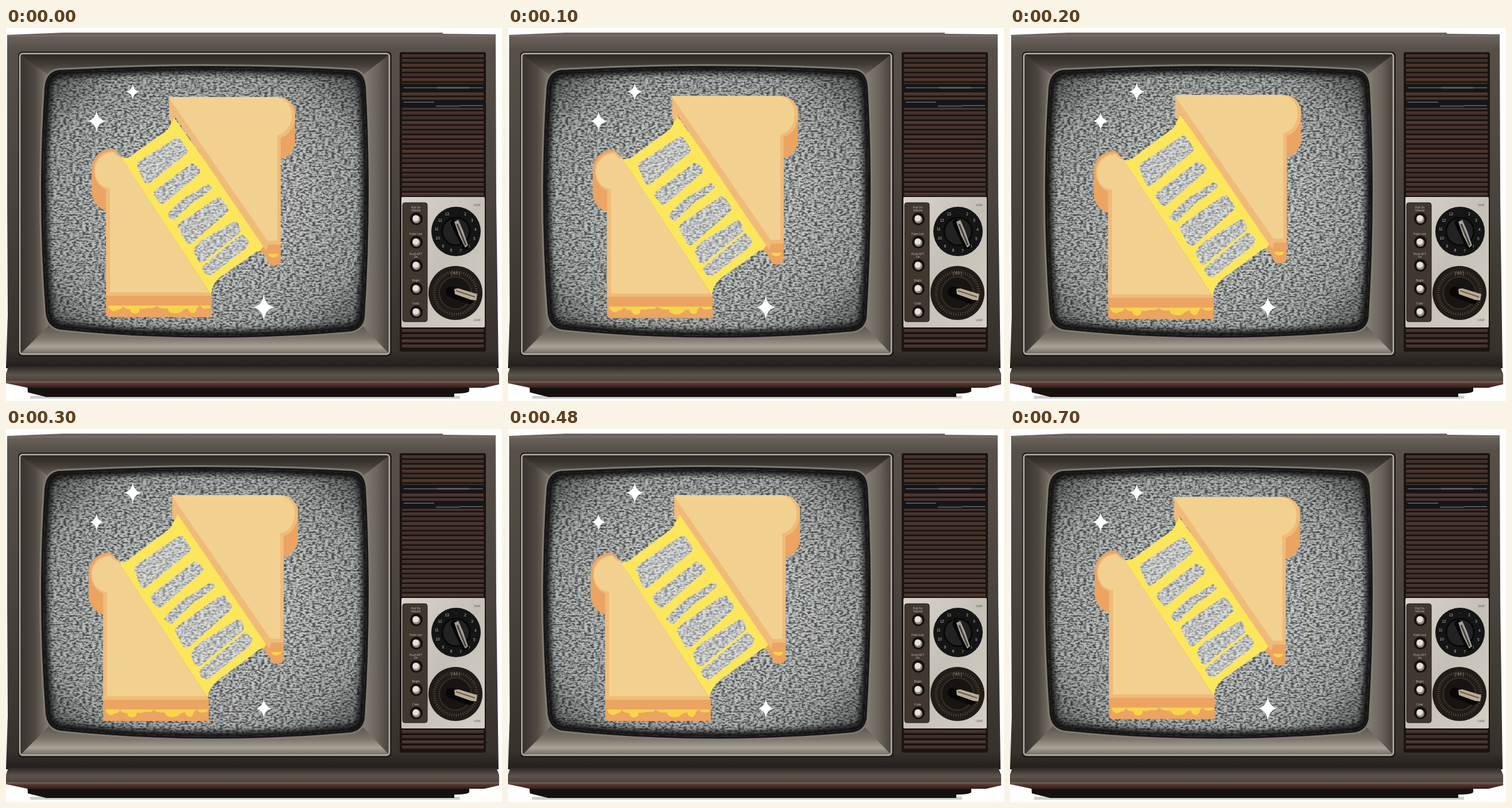
Recreate the animation shown at these times as an HTML page. Size 863 px wide and 649 px high, loop 0.8 s.

```html
<!DOCTYPE html>
<html lang="en">
<head>
<meta charset="utf-8">
<title>Toastie on TV</title>
<style>
html, body { margin: 0; width: 100%; height: 100%; overflow: hidden; background: #fff; }
svg { display: block; width: 100vw; height: 100vh; }
text { font-family: "Liberation Sans", Arial, sans-serif; text-anchor: middle; }
.face { fill: #f2d190; }
.crust { fill: #f0bb79; }
.side { fill: #eba461; }
.drip { fill: #f8d44c; }
</style>
</head>
<body>
<svg viewBox="0 0 863 649" preserveAspectRatio="none">
<defs>
  <linearGradient id="body" x2="0" y2="1">
    <stop stop-color="#6f675f"/><stop offset=".05" stop-color="#575049"/>
    <stop offset=".5" stop-color="#49433d"/><stop offset=".95" stop-color="#37312c"/><stop offset="1" stop-color="#211d1a"/>
  </linearGradient>
  <linearGradient id="top" x2="0" y2="1">
    <stop stop-color="#2b2724"/><stop offset=".5" stop-color="#443e38"/><stop offset="1" stop-color="#6b645b"/>
  </linearGradient>
  <linearGradient id="bottom" x2="0" y2="1">
    <stop stop-color="#5c564e"/><stop offset=".45" stop-color="#7c766b"/><stop offset=".75" stop-color="#a8a297"/><stop offset="1" stop-color="#716a61"/>
  </linearGradient>
  <linearGradient id="left">
    <stop stop-color="#383330"/><stop offset=".5" stop-color="#4e4841"/><stop offset="1" stop-color="#827b70"/>
  </linearGradient>
  <linearGradient id="right">
    <stop stop-color="#857f75"/><stop offset=".55" stop-color="#6a645b"/><stop offset="1" stop-color="#47413b"/>
  </linearGradient>
  <linearGradient id="ledge" x2="0" y2="1">
    <stop stop-color="#2b2724"/><stop offset=".4" stop-color="#5d554d"/><stop offset=".66" stop-color="#4b433d"/>
    <stop offset=".72" stop-color="#7b6155"/><stop offset=".8" stop-color="#56372f"/><stop offset="1" stop-color="#2f1e1a"/>
  </linearGradient>
  <linearGradient id="plate" x2="1" y2="1">
    <stop stop-color="#d8d4cb"/><stop offset=".5" stop-color="#c5c0b6"/><stop offset="1" stop-color="#d3cfc5"/>
  </linearGradient>
  <radialGradient id="shade" r=".7">
    <stop offset=".4" stop-opacity="0"/><stop offset=".72" stop-opacity=".14"/><stop offset="1" stop-opacity=".65"/>
  </radialGradient>
  <filter id="snow" x="0" y="0" width="1" height="1" color-interpolation-filters="sRGB">
    <feTurbulence type="fractalNoise" baseFrequency=".18 .33" numOctaves="2" seed="4"/>
    <feColorMatrix values="0 0 0 1 0  0 0 0 1 0  0 0 0 1 0  0 0 0 0 1"/>
    <feComponentTransfer>
      <feFuncR type="table" tableValues=".28 .28 .3 .39 .62 .76 .78 .79 .8"/>
      <feFuncG type="table" tableValues=".29 .29 .31 .4 .64 .78 .8 .81 .82"/>
      <feFuncB type="table" tableValues=".29 .29 .31 .4 .63 .77 .79 .8 .81"/>
    </feComponentTransfer>
  </filter>
  <filter id="soft"><feGaussianBlur stdDeviation="5"/></filter>
  <path id="glass" d="M92 77Q346 63 602 77 620 79 622 103 633 300 620 503 617 521 599 524 346 547 96 521 76 518 73 496 58 300 71 105 73 80 92 77Z"/>
  <clipPath id="screen"><use href="#glass"/></clipPath>
  <path id="pull" d="M194 223Q212 231 224 218L276 181Q290 172 288 150L458 386Q438 386 430 393L372 434Q358 445 357 463L350 460Z"/>
  <mask id="gaps" maskUnits="userSpaceOnUse" x="0" y="0" width="863" height="649">
    <path fill="#fff" d="M0 0H863V649H0Z"/>
    <g stroke="#000" stroke-width="14" stroke-linejoin="round">
      <path d="M235 238 298 198 309 214 246 264Z"/>
      <path d="M264 288 324 243 331 249 272 299Z"/>
      <path stroke-width="6" d="M284 325Q307 298 325 291L351 275 355 278Q340 292 324 300L292 331Z"/>
      <path d="M306 345 370 302 380 316 319 369Z"/>
      <path d="M334 388Q338 377 354 370L398 344 401 352 340 401Z"/>
      <path stroke-width="9" d="M346 417 410 364 418 372 416 379 355 426 349 423Z"/>
    </g>
  </mask>
  <path id="star" fill="#fff" d="M0-1Q.13-.16 1 0 .13.16 0 1-.13.16-1 0-.13-.16 0-1Z"/>
</defs>

<!-- cabinet -->
<path fill="#bbb" d="M42 640H790V645H42Z" opacity=".7"/>
<path fill="#16110f" d="M37 618H806V632Q803 636 780 636V642H70L38 634Z"/>
<path fill="url(#body)" d="M2 12 100 8H760V10L852 11 853 300 857 592H0L3 500 2 300Z"/>
<path fill="url(#ledge)" d="M4 589H853L858 602V620L832 626H38L0 618V602Z"/>
<path fill="none" stroke="#8a837a" stroke-width="1.5" d="M4 14H850" opacity=".5"/>

<!-- bezel -->
<rect x="21" y="41" width="650" height="531" rx="7" fill="#211e1b"/>
<path fill="url(#top)" d="M25 46H667L620 82H74Z"/>
<path fill="url(#left)" d="M25 46 74 82 62 300 74 520 25 567Z"/>
<path fill="url(#right)" d="M667 46 620 82 632 300 620 520 667 567Z"/>
<path fill="url(#bottom)" d="M25 567 74 518 346 535 620 518 667 567Z"/>
<rect x="24" y="44.500" width="643" height="523" rx="5" fill="none" stroke="#b8b3aa" stroke-width="2.500"/>
<use href="#glass" fill="none" stroke="#817a70" stroke-width="14"/>
<use href="#glass" fill="#151413" stroke="#191716" stroke-width="8"/>

<!-- screen -->
<g clip-path="url(#screen)">
  <rect x="60" y="64" width="572" height="480" filter="url(#snow)"/>
  <rect x="60" y="64" width="572" height="480" fill="url(#shade)"/>
  <use href="#glass" fill="none" stroke="#111" stroke-width="16" filter="url(#soft)"/>
</g>

<!-- speaker and controls -->
<rect x="685" y="42" width="150" height="521" rx="3" fill="#1b1411"/>
<g id="slats"></g>
<path fill="#15161a" d="M688 97H833V109H688ZM688 125H833V139H688Z"/>
<path stroke="#55565a" stroke-width="2" d="M692 104H830M692 129H745M790 135H830"/>
<path stroke="#77777a" stroke-width="3" d="M750 104H806M748 136H790" opacity=".5"/>
<rect x="688" y="294" width="145" height="227" rx="2" fill="url(#plate)"/>
<rect x="690" y="304" width="43" height="207" rx="4" fill="#40372f" stroke="#1d1916"/>
<g id="knobs" font-size="5" fill="#c4beb4"></g>
<g font-size="6" fill="#5a554e"><text x="820" y="310">VHF</text><text x="820" y="510">UHF</text></g>
<circle cx="783" cy="354" r="43" fill="#151515"/>
<circle cx="783" cy="354" r="24" fill="#222" stroke="#080808" stroke-width="3"/>
<g id="dial" font-size="6.5" fill="#c3c0b9"></g>
<path stroke="#060606" stroke-width="13" stroke-linecap="round" d="M780 339 799 379"/>
<path fill="#a5a198" d="M780 337 787 334 795 352 804 378 799 382 788 360Z"/>
<path stroke="#45413c" stroke-width="3" d="M785 341 800 378"/>
<circle cx="782" cy="461" r="47" fill="#211c18"/>
<circle cx="782" cy="461" r="37" fill="none" stroke="#5d5143" stroke-width="5" stroke-dasharray="1 3"/>
<circle cx="782" cy="461" r="28" fill="#171412" stroke="#35302b" stroke-width="2"/>
<text x="782" y="429" font-size="7" fill="#aaa08e">[ 83 ]</text>
<path stroke="#080706" stroke-width="18" stroke-linecap="round" d="M774 459 806 471"/>
<path fill="#b9ac95" d="M780 454 787 453 820 463 818 474 809 473 781 463Z"/>
<path stroke="#6d5a42" stroke-width="2" d="M783 457 816 468"/>

<!-- sandwich -->
<g id="cheese">
  <use href="#pull" fill="#fff" opacity=".35"/>
  <use href="#pull" fill="#fce65c" mask="url(#gaps)"/>
</g>
<g id="upper">
  <path class="side" d="M472 140H503V196C503 213 491 225 478 228V404Q477 413 468 413H463Q457 413 454 404 450 394 442 388L455 370 472 340Z"/>
  <path class="drip" d="M456 393H474Q472 399 465 399 458 399 456 393Z"/>
  <path class="crust" d="M284 120H473C491 120 503 134 503 152 503 173 492 187 478 191V377H456L453 388 293 153 290 163 284 160Z"/>
  <path class="face" d="M284 120H470C486 122 497 135 497 152 497 171 486 183 472 187V370H455L284 122Z"/>
</g>
<g id="lower">
  <path class="side" d="M149 247C149 225 164 210 187 210L191 215 200 224 212 244 356 463H358V503H181Q174 503 174 496V318C159 313 149 300 149 283Z"/>
  <path class="crust" d="M153 247C153 228 166 215 187 214L200 224 354 460 358 466H174V281C161 276 153 263 153 247Z"/>
  <path class="face" d="M155 248C155 231 168 218 187 216 190 222 194 224 201 226L353 460H181V278C165 278 155 264 155 248Z"/>
  <path class="drip" d="M178 483H203Q202 490 194 490 187 496 182 490 178 488 178 483ZM203 483H262Q258 489 248 487 239 490 233 488 232 497 224 497 216 496 216 489 207 490 203 483ZM262 483H357Q356 489 349 488 341 490 338 483 332 485 331 491 328 498 322 495 317 493 317 488 308 489 307 492 300 498 291 496 283 495 281 488 268 490 262 483Z"/>
</g>
<g id="stars"></g>
</svg>
<script>
const $ = id => document.getElementById(id);
const fill = (id, count, draw) => $(id).innerHTML = Array.from({ length: count }, (_, i) => draw(i)).join('');

fill('slats', 34, i => {
  const y = i < 30 ? 46 + i * 8.3 : 524 + (i - 30) * 9;
  const tone = ['#46322b', '#3e2e28', '#4b352d'][i % 3];
  return `<path fill="${tone}" d="M689 ${y}h142v5h-142z"/><path fill="#6b5348" opacity=".5" d="M689 ${y}h142v1h-142z"/>`;
});

const labels = ['Pull On,Volume', 'Fade Low', 'Push AFT,On', 'Bright', 'Color'];
fill('knobs', 5, i => {
  const y = 332 + i * 40.5;
  const text = labels[i].split(',').map((s, j, all) =>
    `<text x="713" y="${y - 13 - (all.length - 1 - j) * 5}">${s}</text>`).join('');
  return `${text}<circle cx="714" cy="${y}" r="11" fill="#15110f"/>
    <circle cx="714" cy="${y + 1}" r="7" fill="#8f897e"/><circle cx="713" cy="${y - 1}" r="5.500" fill="#e6e1d7"/>`;
});

// channels 2 to 13, with a dot between the last and the first
fill('dial', 13, i => {
  const a = (i * 360 / 13 + 28) * Math.PI / 180;
  return `<text x="${783 + 34 * Math.sin(a)}" y="${356.5 - 34 * Math.cos(a)}">${i < 12 ? i + 2 : '·'}</text>`;
});

// centre, half width and height, growth of each per step
const stars = [
  [220.5, 111, 11, 14, 1.4, 1.6],
  [157.5, 162, 16, 19, -1.3, -1.3],
  [448.5, 486, 18.5, 23, -1.7, -1.9]
];

function draw(now) {
  const i = Math.floor(now / 100) % 8;
  const step = Math.min(i, 3, 8 - i);
  const d = step * 1.7;
  $('upper').setAttribute('transform', `translate(${d} ${-d})`);
  $('lower').setAttribute('transform', `translate(${-d} ${d})`);
  // stretch across the cut so that the ends of the gaps follow the slices
  const k = d / 42, x = .84 * k, y = .543 * k, shift = 104 * k;
  $('cheese').setAttribute('transform', `matrix(${1 + x} ${-x} ${-y} ${1 + y} ${-shift} ${shift})`);
  fill('stars', 3, n => {
    const [cx, cy, w, h, dw, dh] = stars[n];
    return `<use href="#star" transform="translate(${cx} ${cy}) scale(${w + dw * step} ${h + dh * step})"/>`;
  });
}

function tick() {
  draw(performance.now());
  requestAnimationFrame(tick);
}
tick();
</script>
</body>
</html>
```
